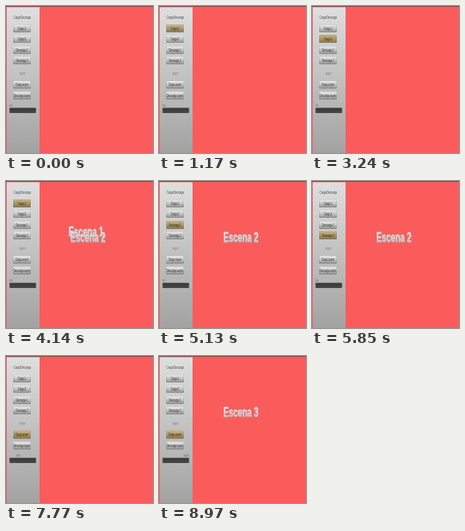
Animation, 184 px wide and 184 px high, one loop 9.21 s. Source, as an HTML page with a canvas:

```html
<!DOCTYPE html>
<html lang="es">
<head>
<meta charset="utf-8">
<title>Escenas</title>
<style>
html, body { margin: 0; width: 100%; height: 100%; overflow: hidden; background: #fa5c5c; }
canvas { display: block; width: 100vw; height: 100vh; }
</style>
</head>
<body>
<canvas id="stage"></canvas>
<script>
const SIZE = 184, LOOP = 9210;
const SQUEEZE = 0.63; // the whole interface is shown narrowed
const FONT = '"Liberation Sans", Arial, sans-serif';

const canvas = document.getElementById('stage');
const ctx = canvas.getContext('2d');

const buttons = [
  { label: 'Carga 1', y: 23 },
  { label: 'Carga 2', y: 36 },
  { label: 'Descarga 1', y: 50 },
  { label: 'Descarga 2', y: 63 },
  { label: 'Carga async', y: 93.5 },
  { label: 'Descarga async', y: 107 }
];

// button, fade-in start and end, fade-out start and end, strength
const hovers = [
  [0, 1080, 1230, 1650, 1740, 1],
  [1, 1690, 1800, 2040, 2170, 1],
  [2, 2130, 2280, 2880, 2980, 1],
  [1, 2960, 3090, 3500, 3630, 1],
  [0, 3630, 3780, 4470, 4590, 1],
  [1, 4540, 4620, 4640, 4740, 0.5],
  [2, 4650, 4800, 5400, 5560, 1],
  [3, 5690, 5850, 6750, 6930, 1],
  [4, 7230, 7380, LOOP, LOOP + 1, 1]
];

const scenes = [
  { label: 'Escena 1', x: 78.2, y: 69, shown: [[1320, 2610], [4140, 5130]] },
  { label: 'Escena 2', x: 80.6, y: 75.8, shown: [[3360, 6420]] },
  { label: 'Escena 3', x: 80.6, y: 75.6, shown: [[8070, LOOP]] }
];

const ramp = (t, a, b) => Math.min(1, Math.max(0, (t - a) / (b - a)));

function shade(y, h, ...colors) {
  const g = ctx.createLinearGradient(0, y, 0, y + h);
  colors.forEach((c, i) => g.addColorStop(i / (colors.length - 1), c));
  return g;
}

function text(str, x, y, size, fill, align = 'center', weight = '', outline = 0) {
  ctx.save();
  ctx.translate(x, y);
  ctx.scale(SQUEEZE, 1);
  ctx.font = `${weight} ${size}px ${FONT}`;
  ctx.textAlign = align;
  ctx.fillStyle = ctx.strokeStyle = fill;
  ctx.fillText(str, 0, 0);
  if (outline) {
    ctx.lineWidth = outline;
    ctx.lineJoin = 'round';
    ctx.strokeText(str, 0, 0);
  }
  ctx.restore();
}

function box(x, y, w, h, fill) {
  ctx.fillStyle = fill;
  ctx.beginPath();
  ctx.roundRect(x, y, w, h, 0.8);
  ctx.fill();
}

function drawButton({ label, y }, glow) {
  const h = 9.8;
  box(9, y, 22, h, shade(y, h, '#c0c0c0', '#707070'));
  box(9.4, y + 0.5, 21.2, h - 1.3, shade(y, h, '#ededed', '#c6c6c6', '#929292'));
  if (glow > 0) {
    ctx.globalAlpha = glow;
    box(9, y, 22, h, shade(y, h, '#b4a27a', '#77664a'));
    box(9.4, y + 0.5, 21.2, h - 1.3, shade(y, h, '#c8b58a', '#ac9562', '#8f7648'));
    ctx.globalAlpha = 1;
  }
  text(label, 20, y + 6.6, 4.7, '#222222');
}

function drawPanel(t) {
  ctx.fillStyle = shade(2, 182, '#dedede', '#c0c0c0', '#a2a2a2');
  ctx.fillRect(1, 1.5, 41, SIZE - 1.5);
  text('Carga/Descarga', 20.3, 16.3, 4.7, '#404040');

  const glow = buttons.map(() => 0);
  for (const [i, a, b, c, d, k] of hovers) {
    glow[i] = Math.max(glow[i], k * ramp(t, a, b) * (1 - ramp(t, c, d)));
  }
  buttons.forEach((b, i) => drawButton(b, glow[i]));
  text('async', 20.5, 86.2, 4.7, '#7c7c7c');

  const load = Math.floor(ramp(t, 7650, 8010) * 6) / 6;
  text(Math.round(load * 100) + '%', 8 + 29.5 * load, 125.6, 4.2, '#5c5c5c', 'right');
  box(4.4, 127.6, 33.2, 6.5, shade(127, 7, '#363636', '#484848'));
}

function drawScene({ label, x, y, shown }, t) {
  if (!shown.some(([a, b]) => t >= a && t < b)) return;
  text(label, x + 0.5, y + 0.8, 16, '#b4a6a6', 'left', 'bold', 0.4);
  text(label, x, y, 16, shade(-12, 12, '#e6e2e2', '#dcd6d6', '#cec6c6'), 'left', 'bold', 0.4);
}

function draw(now) {
  const t = now % LOOP;
  const dpr = window.devicePixelRatio || 1;
  const w = Math.round(innerWidth * dpr), h = Math.round(innerHeight * dpr);
  if (canvas.width !== w || canvas.height !== h) {
    canvas.width = w;
    canvas.height = h;
  }
  ctx.setTransform(w / SIZE, 0, 0, h / SIZE, 0, 0);
  ctx.fillStyle = '#fa5c5c';
  ctx.fillRect(0, 0, SIZE, SIZE);
  ctx.fillStyle = '#844848';
  ctx.fillRect(0, 0, SIZE, 1);
  drawPanel(t);
  scenes.forEach(s => drawScene(s, t));
}

const start = performance.now();
function tick() {
  draw(performance.now() - start);
  requestAnimationFrame(tick);
}
tick();
</script>
</body>
</html>
```
